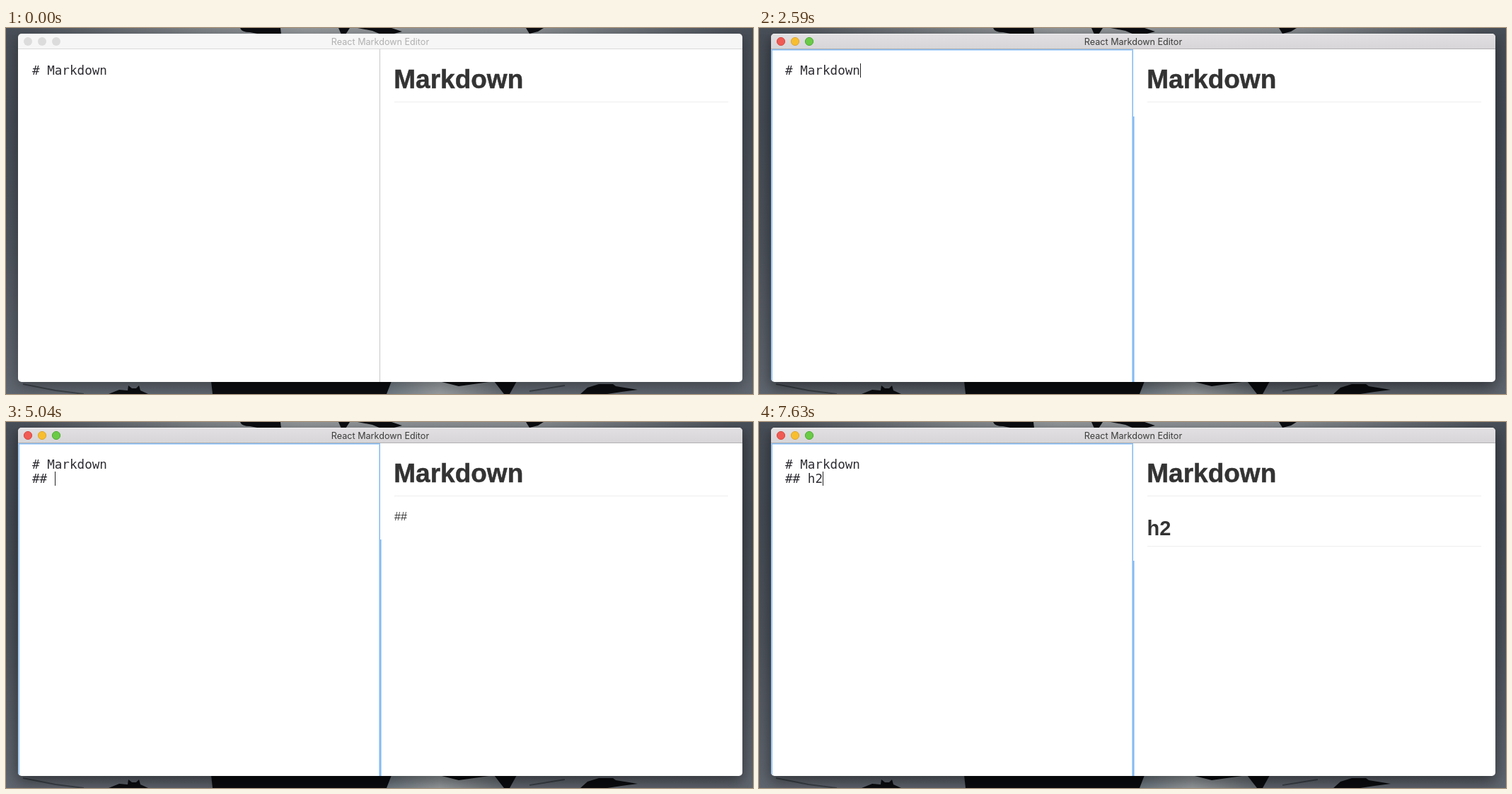
Recreate the animation shown at these times as an HTML page. Size 1056 by 517 pixels, loop 8 s.

```html
<!DOCTYPE html>
<html lang="en">
<head>
<meta charset="utf-8">
<title>React Markdown Editor</title>
<style>
html, body { margin: 0; width: 100%; height: 100%; overflow: hidden; background: #4a5058; }
svg { display: block; width: 1056px; height: 517px; }
text { white-space: pre; fill: #333; }
.title { font: 12.6px Inter, Roboto, sans-serif; text-anchor: middle; }
.code { font: 17.6px "DejaVu Sans Mono", monospace; fill: #2d2d33; }
.body { font: 16px "Liberation Sans", Arial, sans-serif; }
.h1 { font: bold 37px "Liberation Sans", Arial, sans-serif; stroke: #333; stroke-width: .5px; }
.h2 { font: bold 29px "Liberation Sans", Arial, sans-serif; }
.rule { fill: #eee; }

/* every change is a hard cut */
.active, .ring, .caret, .cover, .para, .hash1, .hash2, .letter, .digit {
  animation: 8s step-end infinite;
}
.active { animation-name: active; }
.ring { animation-name: ring; }
.caret { animation-name: caret; }
.cover { animation-name: cover; }
.para { animation-name: para; }
.hash1 { animation-name: hash1; }
.hash2 { animation-name: hash2; }
.letter { animation-name: letter; }
.digit { animation-name: digit; }

@keyframes active { 0% { opacity: 0 } 10.5%, 100% { opacity: 1 } }
@keyframes ring { 0% { opacity: 0 } 20.125%, 100% { opacity: 1 } }
@keyframes para { 0% { opacity: 1 } 89.25%, 100% { opacity: 0 } }
@keyframes hash1 { 0% { fill-opacity: 0 } 54.25%, 100% { fill-opacity: 1 } }
@keyframes hash2 { 0% { fill-opacity: 0 } 56.875%, 100% { fill-opacity: 1 } }
@keyframes letter { 0% { fill-opacity: 0 } 89.25%, 100% { fill-opacity: 1 } }
@keyframes digit { 0% { fill-opacity: 0 } 95.375%, 100% { fill-opacity: 1 } }
@keyframes cover {
  0% { transform: translateY(0) }
  54.25% { transform: translateY(41px) }
  89.25%, 100% { transform: translateY(71px) }
}
@keyframes caret {
  0% { opacity: 0; transform: translate(143px, 50px) }
  20.125% { opacity: 1; transform: translate(143px, 50px) }
  26.25% { opacity: 0; transform: translate(143px, 50px) }
  32.375% { opacity: 1; transform: translate(143px, 50px) }
  39.375% { opacity: 0; transform: translate(143px, 50px) }
  42.875% { opacity: 1; transform: translate(37px, 70px) }
  49.875% { opacity: 0; transform: translate(37px, 70px) }
  54.25% { opacity: 1; transform: translate(47px, 70px) }
  56.875% { opacity: 1; transform: translate(58px, 70px) }
  63% { opacity: 1; transform: translate(69px, 70px) }
  69.125% { opacity: 0; transform: translate(69px, 70px) }
  76.125% { opacity: 1; transform: translate(69px, 70px) }
  82.25% { opacity: 0; transform: translate(69px, 70px) }
  89.25% { opacity: 1; transform: translate(79px, 70px) }
  95.375%, 100% { opacity: 1; transform: translate(90px, 70px) }
}
</style>
</head>
<body>
<svg viewBox="0 0 1056 517">
  <defs>
    <linearGradient id="wall" x2="0" y2="1">
      <stop offset="0" stop-color="#484e57"/>
      <stop offset=".25" stop-color="#454b54"/>
      <stop offset=".6" stop-color="#4d535c"/>
      <stop offset="1" stop-color="#60666f"/>
    </linearGradient>
    <linearGradient id="sky">
      <stop offset="0" stop-color="#484e57"/>
      <stop offset=".25" stop-color="#7d8287"/>
      <stop offset=".4" stop-color="#95999c"/>
      <stop offset=".7" stop-color="#8b9094"/>
      <stop offset="1" stop-color="#484e57"/>
    </linearGradient>
    <linearGradient id="cloth">
      <stop offset="0" stop-color="#6f7a83"/>
      <stop offset=".45" stop-color="#9a9fa2"/>
      <stop offset="1" stop-color="#666d74"/>
    </linearGradient>
    <linearGradient id="bar" x2="0" y2="1">
      <stop offset="0" stop-color="#e2e0e2"/>
      <stop offset="1" stop-color="#d7d5d7"/>
    </linearGradient>
    <filter id="blur" x="-10%" y="-10%" width="120%" height="120%">
      <feGaussianBlur stdDeviation="10"/>
    </filter>
    <clipPath id="frame"><rect x="17" y="8" width="1024" height="492" rx="5"/></clipPath>
    <clipPath id="pane"><rect x="17" y="30" width="1024" height="470"/></clipPath>
  </defs>

  <!-- desktop -->
  <rect width="1056" height="517" fill="url(#wall)"/>
  <rect width="1056" height="9" fill="url(#sky)"/>
  <g fill="#0b0d10">
    <path d="M331 0H388L389 9H360L345 6Q333 6 331 0Z"/>
    <path d="M470 0H486L480 9H474ZM497 0H545L560 5L545 9H530L518 4ZM735 0H760L752 5L740 8Z"/>
    <path d="M145 517L160 511L172 512L173 505L178 509H184L188 505L190 512L201 517Z"/>
    <path d="M290 499H722L712 517H292Z"/>
    <path d="M812 517L822 508L838 503H858L862 506L893 511L870 514L850 517Z"/>
  </g>
  <path d="M545 499H612L640 506L690 499L704 517H538Z" fill="url(#cloth)"/>
  <path d="M24 503L70 512L110 517M740 513L790 505" fill="none" stroke="#3c4249" stroke-width="2"/>

  <!-- window -->
  <rect x="17" y="12" width="1024" height="494" rx="6" opacity=".32" filter="url(#blur)"/>
  <rect class="active" x="17" y="18" width="1024" height="492" rx="6" fill="rgba(0,0,0,.2)" filter="url(#blur)"/>
  <g clip-path="url(#frame)">
    <rect x="17" y="8" width="1024" height="492" fill="#fff"/>
    <rect x="17" y="8" width="1024" height="21" fill="#f6f6f6"/>
    <rect x="17" y="29" width="1024" height="1" fill="#d9d9d9"/>
    <g fill="#dcdcdc">
      <circle cx="31" cy="19" r="6"/><circle cx="51" cy="19" r="6"/><circle cx="71" cy="19" r="6"/>
    </g>
    <text class="title" x="529" y="24" style="fill:#b0b0b0">React Markdown Editor</text>
    <g class="active">
      <rect x="17" y="8" width="1024" height="21" fill="url(#bar)"/>
      <rect x="17" y="8" width="1024" height="1" fill="#f0eff0"/>
      <rect x="17" y="29" width="1024" height="1" fill="#b3b1b3"/>
      <circle cx="31" cy="19" r="5.6" fill="#f05b54" stroke="#d9473f"/>
      <circle cx="51" cy="19" r="5.6" fill="#f8be30" stroke="#dfa32c"/>
      <circle cx="71" cy="19" r="5.6" fill="#6acb46" stroke="#4cab35"/>
      <text class="title" x="529" y="24" style="fill:#3c3c3c">React Markdown Editor</text>
    </g>

    <rect x="528" y="30" width="1" height="470" fill="#c8c8c8"/>
    <g class="ring">
      <path d="M17 30H531V500H527V32H19V500H17Z" fill="#b9d8f8"/>
      <path d="M18 30H530V500H528V31H19V500H18Z" fill="#86bbf2"/>
    </g>
    <g clip-path="url(#pane)">
      <rect class="cover" x="529" y="-41" width="3" height="166" fill="#fff"/>
    </g>
  </g>

  <!-- editor -->
  <text class="code" x="37" y="66"># Markdown</text>
  <text class="code" x="37" y="86"><tspan class="hash1">#</tspan><tspan class="hash2">#</tspan> <tspan class="letter">h</tspan><tspan class="digit">2</tspan></text>
  <rect class="caret" width="1" height="20" fill="#222"/>

  <!-- preview -->
  <text class="h1" x="548.3" y="85">Markdown</text>
  <rect class="rule" x="549" y="104" width="472" height="1"/>
  <g class="para">
    <text class="body" x="549" y="139"><tspan class="hash1">#</tspan><tspan class="hash2">#</tspan></text>
  </g>
  <text class="h2" x="548.5" y="160"><tspan class="letter">h</tspan><tspan class="digit">2</tspan></text>
  <rect class="rule letter" x="549" y="175" width="472" height="1"/>
</svg>
</body>
</html>
```
